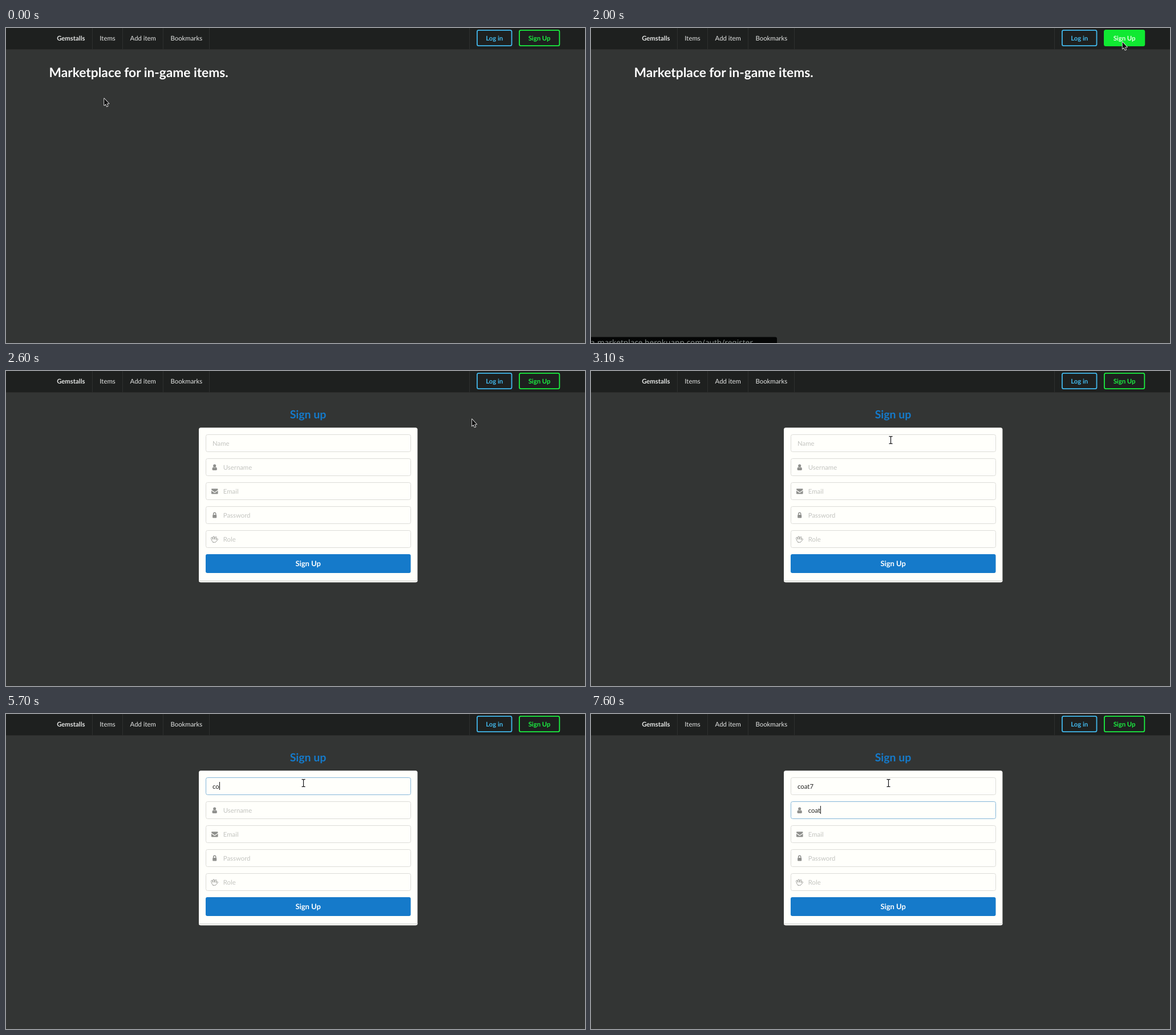
Animation, 1015 px wide and 552 px high, one loop 8000 ms. Source, as an HTML page with a canvas:

```html
<!DOCTYPE html>
<html lang="en">
<head>
<meta charset="utf-8">
<title>Sign up</title>
<style>
  html, body { margin: 0; width: 100%; height: 100%; overflow: hidden; background: #333534; }
  canvas { display: block; width: 100vw; height: 100vh; }
</style>
</head>
<body>
<canvas id="stage" width="1015" height="552"></canvas>
<script>
const ctx = document.getElementById('stage').getContext('2d');
const LOOP = 8000, STEP = 100;
const PAGE = '#333534', PAPER = '#fffffb', LINE = [220, 220, 216], FOCUS = [133, 183, 217];
const BLUE = '#157aca', SKY = '#42b8ec', GREEN = '#1bee40', ICON = '#8f908d';
const BODY = 11.35, TITLE = 22.72;
const WORD = 'coat7';

// Key moments
const OPEN_FORM = 2300, FOCUS_NAME = 3300, TYPE_NAME = 5700, FOCUS_USER = 6700, TYPE_USER = 7400;
const BLINK = 640, FADE = 200;

const clamp = (v, a = 0, b = 1) => Math.min(b, Math.max(a, v));
const within = (v, a, b) => v >= a && v < b;
const easeOut = u => 1 - (1 - u) ** 3;
const smooth = u => u * u * (3 - 2 * u);
const linear = u => u;

// Pointer moves along quadratic curves between its resting places
const moves = [
  { start: 600, end: 900, ease: linear, from: [172, 123], bend: [420, 212], to: [588, 174] },
  { start: 1000, end: 1700, ease: easeOut, from: [588, 174], bend: [813, 100], to: [931.5, 24] },
  { start: 2300, end: 3100, ease: smooth, from: [931.5, 24], bend: [760, 140], to: [525.5, 121] },
  { start: 3200, end: 3400, ease: linear, from: [525.5, 121], bend: [523.5, 121], to: [521.5, 121] }
];

function pointerAt(t) {
  const m = moves.filter(m => m.start <= t).pop() || moves[0];
  const u = m.ease(clamp((t - m.start) / (m.end - m.start))), v = 1 - u;
  return m.from.map((a, i) => v * v * a + 2 * u * v * m.bend[i] + u * u * m.to[i]);
}

// The pause before each letter of the name grows by one step
function nameLength(t) {
  const n = (t - TYPE_NAME) / STEP;
  return n < 0 ? 0 : Math.min(5, 2 + Math.floor((Math.sqrt(1 + 8 * n) - 1) / 2));
}

const userLength = t => t < TYPE_USER ? 0 : Math.min(4, 2 + (t - TYPE_USER) / STEP);

function caretOn(t, focusTime, typeTime) {
  return t >= typeTime || Math.floor((t - focusTime + 80) / BLINK) % 2 === 0;
}

function borderColor(t, focusTime, blurTime) {
  const ramp = start => clamp((t - start + STEP) / FADE);
  const f = ramp(focusTime) - ramp(blurTime);
  return `rgb(${LINE.map((c, i) => c + (FOCUS[i] - c) * f)})`;
}

function text(s, x, y, { size = BODY, color = '#e4e5e4', weight = 400, align = 'left', font = 'Lato' } = {}) {
  ctx.font = `${weight} ${size}px ${font}, sans-serif`;
  ctx.textRendering = 'geometricPrecision';
  ctx.textAlign = align;
  ctx.fillStyle = color;
  ctx.fillText(s, x, y);
  return ctx.measureText(s).width;
}

function box(x, y, w, h, r, fill, stroke, width = 1) {
  const d = stroke ? width / 2 : 0;
  ctx.beginPath();
  ctx.roundRect(x + d, y + d, w - 2 * d, h - 2 * d, r);
  if (fill) { ctx.fillStyle = fill; ctx.fill(); }
  if (stroke) { ctx.strokeStyle = stroke; ctx.lineWidth = width; ctx.stroke(); }
}

function rect(x, y, w, h, color) {
  ctx.fillStyle = color;
  ctx.fillRect(x, y, w, h);
}

function shape(d, x, y, fill, stroke, width = 1) {
  const p = new Path2D(d);
  ctx.save();
  ctx.translate(x, y);
  ctx.lineJoin = ctx.lineCap = 'round';
  if (stroke) { ctx.strokeStyle = stroke; ctx.lineWidth = width; ctx.stroke(p); }
  if (fill) { ctx.fillStyle = fill; ctx.fill(p); }
  ctx.restore();
}

function navButton(label, x, w, color, fill) {
  box(x, 3, w, 29, 2.6, fill, fill || color, 1.8);
  text(label, x + w / 2, 22, { weight: 700, align: 'center', color: fill ? '#e6ffe6' : color });
}

function nav(hover) {
  rect(0, 0, 1015, 37.4, '#1e201f');
  for (const x of [151, 204, 275, 356, 812]) rect(x, 0, 1, 37, '#2e302f');
  const center = { align: 'center' };
  text('Gemstalls', 113.8, 22, { weight: 700, align: 'center' });
  text('Items', 178, 22, center);
  text('Add item', 240.2, 22, center);
  text('Bookmarks', 316.3, 22, center);
  navButton('Log in', 825, 62.4, SKY);
  navButton('Sign Up', 899, 72.2, GREEN, hover && '#10e932');
}

const icons = {
  user(y) {
    shape('M0-5.3C3.6-5.3 3.2.2 0 .2S-3.6-5.3 0-5.3ZM-2.2-.4C-1 .9 1 .9 2.2-.4 3.8-.1 4.3 1.6 4.2 3.5 4.2 4.6 3.5 5.1 2.6 5.1H-2.6C-3.5 5.1-4.2 4.6-4.2 3.5-4.3 1.6-3.8-.1-2.2-.4Z', 365.7, y, ICON);
  },
  mail(y) {
    shape('M-5.8-3.3Q-5.8-4.5-4.8-4.5H4.8Q5.8-4.5 5.8-3.3C5.4-1.8 2 .2.8 1Q0 1.5-.8 1C-2-.2-5.4-1.8-5.8-3.3ZM-5.8-1.2C-4.4.3-2.4 1.4-1.2 2.2Q0 3 1.2 2.2C2.4 1.4 4.4.3 5.8-1.2V3.6Q5.8 4.6 4.8 4.6H-4.8Q-5.8 4.6-5.8 3.6Z', 365.8, y, ICON);
  },
  lock(y) {
    shape('M-2.1-.5V-2.4A2.1 2.2 0 0 1 2.1-2.4V-.5', 365.7, y, null, ICON, 1.4);
    box(362.2, y - 0.7, 7, 5.4, 0.8, ICON);
  },
  hand(y) {
    shape('M-2.5 5.2C-4.5 4-6-1-5.6-2.6-5.2-4-3.6-3.6-3.3-2.2L-2.6.3-2.4-3.8C-2.3-5.5-.1-5.5 0-3.8L.1.4 1.5-3.6C2-5 4-4.4 3.6-2.8L2.8.8 4.4-.6C5.6-1.4 6.6-.2 5.8.8L2.6 4.6C1.6 5.6-.8 5.8-2.5 5.2Z', 365.4, y, null, ICON, 0.9);
  }
};

function field(row, label, icon, { value = '', focused, caret, border = `rgb(${LINE})` } = {}) {
  const y = 111 + 42 * row, x = icon ? 380.8 : 362;
  box(350, y, 360, 31, 3, PAPER, border);
  if (icon) icons[icon](y + 15.8);
  if (!value) text(label, x, y + 19.8, { color: focused ? '#8d8e8b' : '#c3c4c0' });
  const w = text(value, x, y + 19.8, { color: '#20211f' });
  if (focused && caret) rect(Math.round(x + w), y + 8, 1, 14, '#111');
}

function form(t) {
  text('Sign up', 529.5, 83, { size: 19.45, weight: 700, align: 'center', color: BLUE });
  box(338, 99.3, 383.4, 271, 3.5, PAPER);
  box(338, 367, 383.4, 3.3, [0, 0, 3, 3], '#f6f6f3');
  rect(338, 367, 383.4, 1, '#d6d7d3');

  field(0, 'Name', null, {
    value: WORD.slice(0, nameLength(t)),
    focused: within(t, FOCUS_NAME, FOCUS_USER),
    caret: caretOn(t, FOCUS_NAME, TYPE_NAME),
    border: borderColor(t, FOCUS_NAME, FOCUS_USER)
  });
  field(1, 'Username', 'user', {
    value: WORD.slice(0, userLength(t)),
    focused: t >= FOCUS_USER,
    caret: caretOn(t, FOCUS_USER, TYPE_USER),
    border: borderColor(t, FOCUS_USER, LOOP + FADE)
  });
  field(2, 'Email', 'mail');
  field(3, 'Password', 'lock');
  field(4, 'Role', 'hand');
  box(350, 321, 359.5, 33, 3, BLUE);
  text('Sign Up', 529.6, 342.3, { size: 12.95, weight: 700, align: 'center', color: '#fff' });
}

function statusBar() {
  box(-4, 541.5, 330, 16, 3, '#050606');
  text('a-marketplace.herokuapp.com/auth/register', -1, 555.5,
    { size: 13.6, color: '#858d8b', font: '"Noto Sans"' });
}

function arrow(x, y) {
  shape('M.5.8V13L3.1 10.6 5.2 15 7 14.2 5 9.9H8.9Z', x - 0.4, y - 0.4, '#111', '#fff', 1.5);
}

function hand(x, y) {
  shape('M-1.8 1V7.2L-3.6 5.9C-4.9 5-6 6.3-5 7.4L-2.5 10.1V12H4.5V10.2C5.6 8.8 5.7 7.4 5.6 5.7 5.5 4.6 4.1 4.5 3.7 5.2 3.5 4.1 2.3 4 1.8 4.8 1.5 4.2.8 4.1.3 4.4V1C.3-.5-1.8-.5-1.8 1Z', x + 0.8, y, '#0b0b0b', '#fff', 1.8);
}

function beam(x, y) {
  const d = 'M-2.6-6.3H-1Q0-6.3 0-5.3 0-6.3 1-6.3H2.6M0-5.3V5.3M-2.6 6.3H-1Q0 6.3 0 5.3 0 6.3 1 6.3H2.6';
  shape(d, x, y, null, '#fff', 2.8);
  shape(d, x, y, null, '#151515', 1.2);
}

function draw() {
  const t = Math.floor(performance.now() % LOOP / STEP) * STEP;
  const formOpen = t >= OPEN_FORM;
  const [x, y] = pointerAt(t);
  const overButton = within(x, 899, 971) && within(y, 3, 32);
  const overName = formOpen && within(x, 350, 710) && within(y, 111, 142);

  rect(0, 0, 1015, 552, PAGE);
  nav(overButton && !formOpen);
  if (formOpen) form(t);
  else text('Marketplace for in-game items.', 75.6, 86, { size: TITLE, weight: 700, color: '#fff' });
  if (within(t, 1900, 2500)) statusBar();
  const cursor = overName ? beam : overButton && formOpen ? hand : arrow;
  cursor(x, y);
  requestAnimationFrame(draw);
}
draw();
</script>
</body>
</html>
```
